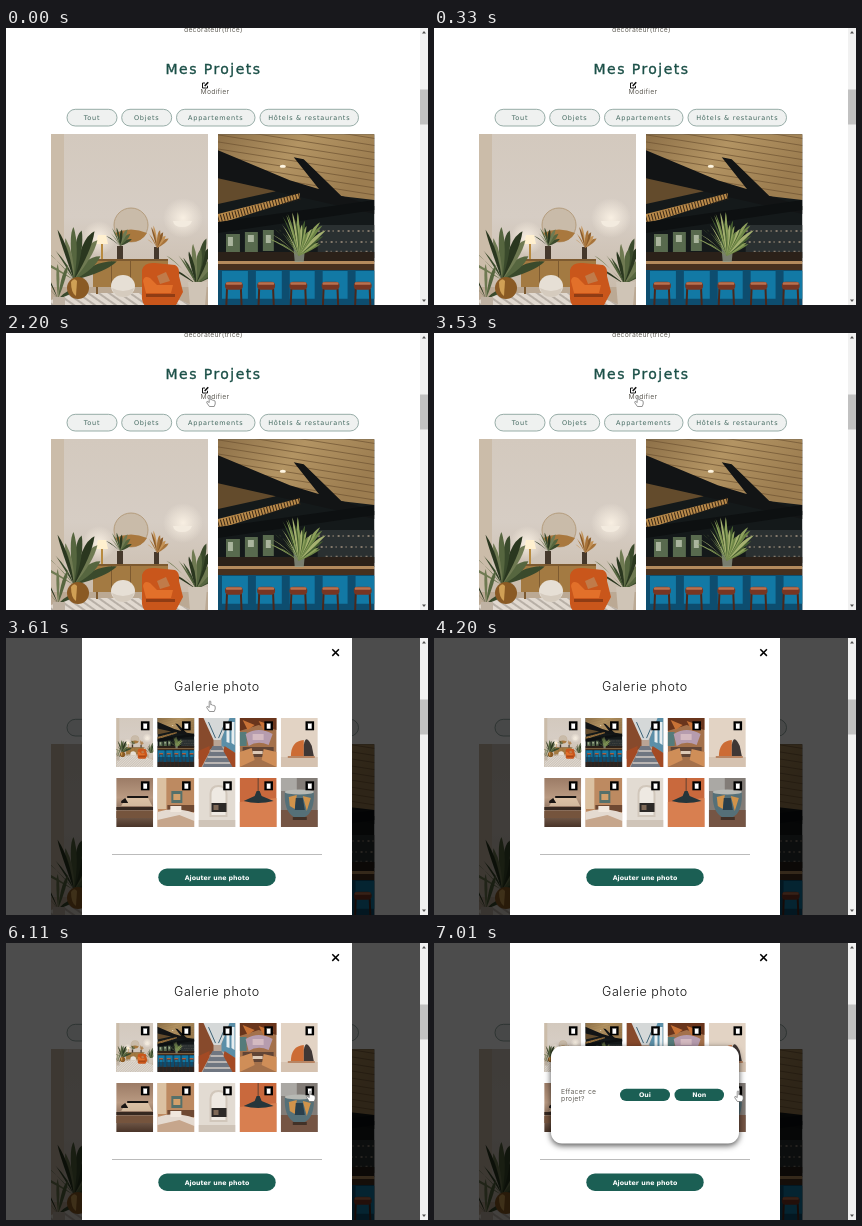
Write an HTML page that moves like this. It is 422x277 px and loops after 8 s.

```html
<!DOCTYPE html>
<html lang="fr">
<head>
<meta charset="utf-8">
<title>Mes Projets</title>
<style>
html, body { margin: 0; width: 100%; height: 100%; overflow: hidden; background: #fff; }
svg { display: block; }
#stage { width: 422px; height: 277px; }
text { font-family: Inter, "Open Sans", sans-serif; font-size: 6.8px; letter-spacing: .25px; fill: #625f58; }
.wide { font-family: "DejaVu Sans", sans-serif; font-size: 6.5px; letter-spacing: .75px; fill: #42685f; text-anchor: middle; }
.h1 { font-size: 14px; letter-spacing: 1.45px; fill: #1c5048; stroke: #1c5048; stroke-width: .35; }
.h2 { font-size: 12.5px; font-weight: 300; letter-spacing: .6px; fill: #111; }
.light { font-size: 6.3px; font-weight: 700; letter-spacing: 0; fill: #fff; }
.filter rect { fill: #eff1f0; stroke: #7f9a94; stroke-width: .8; }
.pill { fill: #1b5f54; }
#modal, #confirm, #hand, #arrow { opacity: 0; animation: 8s step-end infinite; }
#modal { animation-name: modal; }
#confirm { animation-name: confirm; }
#hand { animation-name: hand; }
#arrow { animation-name: arrow; }
#card { filter: drop-shadow(0 2px 3px rgba(0, 0, 0, .7)); }
@keyframes modal { 0% { opacity: 0; } 45.125%, 100% { opacity: 1; } }
@keyframes confirm { 0% { opacity: 0; } 87.625%, 100% { opacity: 1; } }
@keyframes hand {
  0% { opacity: 0; transform: translate(200px, 62px); }
  15.375% { opacity: 1; transform: translate(200px, 62px); }
  52.5% { opacity: 0; transform: translate(300px, 147px); }
  76.375%, 100% { opacity: 1; transform: translate(300px, 147px); }
}
@keyframes arrow {
  0% { opacity: 0; transform: translate(294px, 152px); }
  69.625% { opacity: 1; transform: translate(294px, 152px); }
  70.75% { opacity: 1; transform: translate(300px, 153px); }
  75.5% { opacity: 1; transform: translate(302px, 149px); }
  76.375%, 100% { opacity: 0; transform: translate(302px, 149px); }
}
</style>
</head>
<body>
<svg id="stage" viewBox="0 0 422 277">
  <defs>
    <linearGradient id="wall" x2="0" y2="1"><stop stop-color="#d3c9be"/><stop offset=".4" stop-color="#d6cdc4"/><stop offset=".75" stop-color="#c9bbab"/></linearGradient>
    <linearGradient id="wood" x2="1" y2=".4"><stop stop-color="#8d7048"/><stop offset=".5" stop-color="#b39463"/><stop offset="1" stop-color="#9c7d50"/></linearGradient>
    <linearGradient id="dusk" x2="0" y2="1"><stop stop-color="#9c7c66"/><stop offset=".4" stop-color="#b99a82"/><stop offset="1" stop-color="#493428"/></linearGradient>
    <radialGradient id="glow"><stop stop-color="#f8efe2"/><stop offset="1" stop-color="#f8efe2" stop-opacity="0"/></radialGradient>
    <pattern id="planks" width="30" height="7" patternUnits="userSpaceOnUse" patternTransform="rotate(9)"><path d="M0 .5H30" stroke="#6d5230" stroke-width=".7"/></pattern>
    <pattern id="weave" width="6" height="6" patternUnits="userSpaceOnUse" patternTransform="rotate(35)"><path d="M0 1H6" stroke="#958c83" stroke-width="1.1"/></pattern>

    <symbol id="p0" viewBox="0 0 157 208">
      <path fill="url(#wall)" d="M0 0H157V208H0Z"/>
      <path fill="#cbbca9" d="M0 0H13V150H0Z"/>
      <circle cx="48" cy="104" r="17" fill="url(#glow)"/>
      <circle cx="132" cy="84" r="20" fill="url(#glow)"/>
      <path fill="#f3ebdf" d="M122 87H141Q139 93 131 93T122 87Z"/>
      <path fill="#bba994" d="M0 153H157V208H0Z"/>
      <path fill="#e1d9d0" d="M0 166 22 159H112L157 178V208H0Z"/>
      <path fill="url(#weave)" d="M0 166 22 159H112L157 178V208H0Z"/>
      <circle cx="80" cy="91" r="17" fill="#c9bba9" stroke="#ae9370" stroke-width=".8"/>
      <path fill="#a9783e" d="M64 99Q80 92 96 99Q91 108 80 108T64 99Z"/>
      <path fill="#a37a42" d="M42 125H117V153H42Z"/>
      <path fill="#7d5a30" d="M42 125H117V127H42ZM60 127H61V153H60ZM79 127H80V153H79ZM45 153H47V160H45ZM111 153H113V160H111Z"/>
      <path fill="#fff0cf" d="M47 101H55L57 110H45Z"/>
      <path fill="#b88a3f" d="M50 110H52V125H50Z"/>
      <path fill="#46392c" d="M66 112H72V125H66ZM103 113H108V125H103Z"/>
      <g id="leaves0"></g>
      <path fill="#bfb2a3" d="M2 163H14V180H2Z"/>
      <ellipse cx="27" cy="154" rx="11" ry="11" fill="#8a5a24"/>
      <path fill="#d0a055" d="M20 148Q23 143 26 147L25 162Q20 159 20 148Z"/>
      <path fill="#c9561b" d="M91 136Q93 128 104 129L124 131Q129 133 128 142L132 158 124 173H96Q90 170 91 159Z"/>
      <path fill="#e2702a" d="M92 147Q93 141 99 144L106 151H122L120 159H95Z"/>
      <path fill="#8f3c14" d="M95 160H124V163H95Z"/>
      <path fill="#c07b4a" d="M106 142 115 138 119 147 109 150Z"/>
      <ellipse cx="72" cy="152" rx="12" ry="11" fill="#e6dfd5"/>
      <path fill="#d5cbbe" d="M61 154Q72 160 83 154Q81 163 72 163T61 154Z"/>
      <path fill="#cfc4b6" d="M137 148H156L154 172H139Z"/>
    </symbol>

    <symbol id="p1" viewBox="0 0 157 208">
      <path fill="#14191a" d="M0 0H157V208H0Z"/>
      <path fill="url(#wood)" d="M0 0H157V66L90 58 0 22Z"/>
      <path fill="url(#planks)" d="M0 0H157V66L90 58 0 22Z"/>
      <path fill="#121415" d="M0 16 72 46 157 72V80L0 44ZM76 23 86 25 124 62 110 66Z"/>
      <path fill="#634b2c" d="M0 44 58 57 0 70Z"/>
      <path fill="#b98a4a" d="M0 80 82 59V64L0 90Z"/>
      <path d="M0 85 82 62" stroke="#382716" stroke-width="7" stroke-dasharray="1 2"/>
      <path fill="#0d1011" d="M0 88 157 66V76L0 99Z"/>
      <ellipse cx="65" cy="32" rx="3" ry="1.6" fill="#fff6e2"/>
      <path fill="#586a4e" d="M8 100H22V118H8ZM27 98H40V118H27ZM45 96H56V117H45Z"/>
      <path fill="#aab59e" d="M10 103H15V112H10ZM30 101H36V108H30ZM48 101H53V109H48Z"/>
      <path fill="#2a3031" d="M100 91H157V124H100Z"/>
      <path d="M100 97H157M103 108H157M108 118H157" stroke="#84796b" stroke-width="2.2" stroke-dasharray="2 3 1 4"/>
      <path fill="#2b2119" d="M0 118H157V128H0Z"/>
      <path fill="#b38a5d" d="M0 127H157V130H0Z"/>
      <path fill="#46301f" d="M0 130H157V136H0Z"/>
      <path fill="#0d4d6f" d="M0 136H157V186H0Z"/>
      <path fill="#1279a5" d="M4 137H30V165H4ZM38 137H64V165H38ZM72 137H97V165H72ZM105 137H130V165H105ZM138 137H157V165H138Z"/>
      <path fill="#929d8b" opacity=".75" d="M75 106H88L86 128H77Z"/>
      <g id="leaves1"></g>
      <path fill="#292522" d="M0 186H157V208H0Z"/>
      <g id="stools"></g>
    </symbol>

    <symbol id="p2" viewBox="0 0 37 49">
      <path fill="#b9a495" d="M0 0H37V49H0Z"/><path fill="#d5d8d8" d="M3 0H33L22 22H15Z"/>
      <path fill="#874a2c" d="M0 0H5L15 22V29L0 41Z"/><path fill="#5b8fa8" d="M37 0H31L23 21V28L37 35Z"/>
      <path fill="#e7eef0" d="M33 4H36V27L33 25ZM28 10H31V25L28 24Z"/><path fill="#6f7681" d="M14 28H23L35 49H4Z"/>
      <path d="M12 33H26M9 39H29M6 45H32" stroke="#d2cac4" stroke-width="1.5"/>
      <path fill="#a34a24" d="M0 33 11 28V34L3 49H0ZM26 28 37 35V49H34L25 33Z"/>
      <path d="M10 4 17 20M27 4 20 20" stroke="#3d6478"/>
    </symbol>
    <symbol id="p3" viewBox="0 0 37 49">
      <path fill="#a4714b" d="M0 0H37V49H0Z"/><path fill="#69351c" d="M0 0H37V12L19 7 0 13Z"/>
      <path fill="#c87236" d="M3 2 15 7 8 12ZM19 3 34 8 25 14Z"/><path fill="#557b7b" d="M0 14H7V28H0Z"/>
      <path fill="#b69cae" d="M6 16Q19 8 33 16L29 27Q18 22 9 28Z"/><path fill="#d4bac1" d="M13 16H24V22H13Z"/>
      <path fill="#614536" d="M3 29H34V39H3Z"/><path fill="#cf8e58" d="M0 34 12 30 15 42 0 49ZM24 31 37 34V49L22 42Z"/>
      <path fill="#ddc9b6" d="M13 33H23V36H13Z"/>
    </symbol>
    <symbol id="p4" viewBox="0 0 37 49">
      <path fill="#e2d3c4" d="M0 0H37V49H0Z"/><path fill="#d5c2b0" d="M0 39H37V49H0Z"/>
      <path fill="#cc6c35" d="M10 39Q10 23 23 22V39Z"/><path fill="#3f3735" d="M23 27Q25 15 31 28L33 38H23Z"/><path fill="#b88563" d="M7 38H34V40H7Z"/>
    </symbol>
    <symbol id="p5" viewBox="0 0 37 49">
      <path fill="url(#dusk)" d="M0 0H37V49H0Z"/><path fill="#ead2b4" opacity=".7" d="M10 20H32L36 28H5Z"/>
      <path fill="#191513" d="M11 18H32V20H11ZM5 23 9 20 12 25H5Z"/><path fill="#352820" d="M0 29H37V32H0Z"/><path fill="#75543d" d="M0 33H37V40H0Z"/>
    </symbol>
    <symbol id="p6" viewBox="0 0 37 49">
      <path fill="#bd8a61" d="M0 0H37V49H0Z"/><path fill="#dbc1a1" d="M0 0H9V31H0Z"/>
      <path fill="#55706a" d="M14 13H25V25H14Z"/><path fill="#d3a06b" d="M16 16H23V22H16Z"/>
      <path fill="#6f4932" d="M10 27H37V34H10Z"/><path fill="#e4dad0" d="M0 34Q17 28 37 35V49H0Z"/>
      <path fill="#c6a68c" d="M0 42 22 37 37 43V49H0Z"/><path fill="#f0e7dd" d="M13 28H24V34H13Z"/>
    </symbol>
    <symbol id="p7" viewBox="0 0 37 49">
      <path fill="#e2dbd2" d="M0 0H37V49H0Z"/><path fill="#d1c7bb" d="M11 39V16Q11 7 20 7T29 16V39Z"/>
      <path fill="#eee9e2" d="M13 37V17Q13 9 20 9T27 17V37Z"/><path fill="#2c2927" d="M13 25H28V34H13Z"/>
      <path fill="#7e6957" d="M15 27H20V32H15Z"/><path fill="#cfc4b8" d="M0 42H37V49H0Z"/>
    </symbol>
    <symbol id="p8" viewBox="0 0 37 49">
      <path fill="#c9693d" d="M0 0H37V49H0Z"/><path fill="#d87f50" d="M0 24 37 20V49H0Z"/>
      <path d="M18.5 0V14" stroke="#33302f" stroke-width=".7"/><path fill="#26363b" d="M17 13H20L22 18 34 23Q18 27 4 23L15 18Z"/>
    </symbol>
    <symbol id="p9" viewBox="0 0 37 49">
      <path fill="#827c77" d="M0 0H37V49H0Z"/><path fill="#aaa8a4" d="M0 0H16V13H0Z"/><path fill="#755544" d="M0 32H37V49H0Z"/>
      <path fill="#557078" d="M4 14H33Q34 34 24 39H13Q3 33 4 14Z"/><path fill="#d0934b" d="M8 19 16 17 14 31 9 28ZM22 18 30 20 26 33Z"/>
      <path fill="#293f4c" d="M15 20H22L24 32H14Z"/><ellipse cx="18.5" cy="14" rx="14.5" ry="2.5" fill="#b7b9b4"/><path fill="#423127" d="M12 39H26V42H12Z"/>
    </symbol>
    <g id="bin">
      <path d="M0 0H8.6V9H0Z"/><path fill="#fff" d="M2.2 1.6H6.4V2.3H2.2ZM2.4 2.7H6.2V7.5H2.4Z"/>
    </g>
  </defs>

  <path fill="#fff" d="M0 0H422V277H0Z"/>
  <text x="178" y="4">décorateur(trice)</text>
  <text class="wide h1" x="207.5" y="45.7">Mes Projets</text>
  <g fill="none" stroke="#111">
    <path d="M199 55H196.5V60H201.5V57.8"/>
    <path d="M198.7 58 202.2 54.2" stroke-width="1.6"/>
  </g>
  <text x="194.5" y="66.3">Modifier</text>
  <g id="filters" class="filter"></g>
  <use href="#p0" x="45" y="106" width="157" height="208"/>
  <use href="#p1" x="212" y="106" width="156.5" height="208"/>

  <g id="modal">
    <path d="M0 0H414V277H0Z" opacity=".7"/>
    <path fill="#fff" d="M76 0H346V277H76Z"/>
    <path d="M326.3 11.3 332.9 17.9M332.9 11.3 326.3 17.9" stroke="#000" stroke-width="1.5"/>
    <text class="h2" x="168" y="52.5">Galerie photo</text>
    <g id="thumbs"></g>
    <path d="M106 216.5H316" stroke="#bbb"/>
    <rect class="pill" x="152.3" y="230.5" width="117.4" height="17.4" rx="8.7"/>
    <text class="wide light" x="211" y="241.6">Ajouter une photo</text>
  </g>

  <g id="confirm">
    <rect id="card" x="117" y="103" width="188" height="97.5" rx="11" fill="#fff"/>
    <text x="127" y="150.7">Effacer ce</text>
    <text x="127" y="157.7">projet?</text>
    <rect class="pill" x="186" y="145.7" width="50" height="12.4" rx="6.2"/>
    <rect class="pill" x="240.5" y="145.7" width="49.5" height="12.4" rx="6.2"/>
    <text class="wide light" x="211" y="154.3">Oui</text>
    <text class="wide light" x="265.2" y="154.3">Non</text>
  </g>

  <path fill="#f1f1f1" d="M414 0H422V277H414Z"/>
  <path fill="#c1c1c1" d="M414 61.5H422V96.5H414Z"/>
  <path fill="#505050" d="M416 5.5 418 3 420 5.5ZM416 271.5 418 274 420 271.5Z"/>

  <path id="arrow" fill="#fff" stroke="#333" stroke-width=".5" d="M.5.5V9L2.5 7.2 3.8 10.3 5.1 9.7 3.8 6.8H6.5Z"/>
  <path id="hand" fill="#fff" stroke="#666" stroke-width=".7" d="M3.4 11.5 .8 7.8Q.4 6.2 1.8 6.5L3.2 7.6V1.5Q4 .1 4.8 1.5V4.8Q6 4.2 6.4 5.2Q7.4 4.7 7.8 5.7Q9.2 5.4 9.2 6.8V9L8.2 11.5Z"/>
</svg>
<script>
const $ = id => document.getElementById(id);

let seed = 7;
const rnd = () => (seed = seed * 16807 % 2147483647) / 2147483647;

// Pointed leaves fanning out from one root
function plant(x, y, r, count, width, colors) {
  let out = '';
  for (let i = 0; i < count; i++) {
    const a = -Math.PI * (.1 + .8 * (i + rnd() * .8) / count);
    const len = r * (.6 + .4 * rnd());
    const ex = x + Math.cos(a) * len * .75, ey = y + Math.sin(a) * len;
    const mx = x + Math.cos(a) * len * .45, my = y + Math.sin(a) * len * .75;
    out += `<path d="M${x} ${y}Q${mx - width} ${my - width} ${ex} ${ey}Q${mx + width} ${my + width} ${x} ${y}" fill="${colors[i % colors.length]}"/>`;
  }
  return out;
}

const greens = ['#3a4a2c', '#56663f', '#6f7a52', '#2a371f'];
const straw = ['#a8743a', '#c49357', '#8c5c2a'];
$('leaves0').innerHTML = plant(23, 146, 62, 11, 6, greens) + plant(7, 165, 42, 5, 3, greens) +
  plant(145, 150, 50, 12, 5, greens) + plant(69, 112, 24, 8, 2.5, greens) + plant(106, 114, 24, 8, 2.5, straw);
$('leaves1').innerHTML = plant(81, 122, 46, 26, 2.5, ['#6c8545', '#8da05c', '#435c2e', '#a5b170']);

let stools = '';
for (let i = 0; i < 5; i++) {
  const x = 16 + i * 32.3;
  stools += `<path d="M${x - 7} 155 ${x - 9} 208M${x + 7} 155 ${x + 9} 208M${x - 8} 183H${x + 8}" fill="none" stroke="#4a271b" stroke-width="2"/>` +
    `<rect x="${x - 9}" y="148" width="18" height="8" rx="4" fill="#773522"/>` +
    `<rect x="${x - 8}" y="148.5" width="16" height="2.5" rx="1.2" fill="#b8714f"/>`;
}
$('stools').innerHTML = stools;

$('filters').innerHTML = [
  ['Tout', 61, 50], ['Objets', 115.7, 50], ['Appartements', 170.5, 78.5], ['Hôtels &amp; restaurants', 254, 98.5]
].map(([label, x, w]) => `<rect x="${x}" y="81.3" width="${w}" height="16.7" rx="8.3"/>` +
  `<text class="wide" x="${x + w / 2}" y="92">${label}</text>`).join('');

let thumbs = '';
for (let i = 0; i < 10; i++) {
  const x = 110.2 + i % 5 * 41.15, y = i < 5 ? 80 : 140;
  thumbs += `<use href="#p${i}" x="${x}" y="${y}" width="37" height="49.2"/><use href="#bin" x="${x + 24.7}" y="${y + 3.3}"/>`;
}
$('thumbs').innerHTML = thumbs;
</script>
</body>
</html>
```
